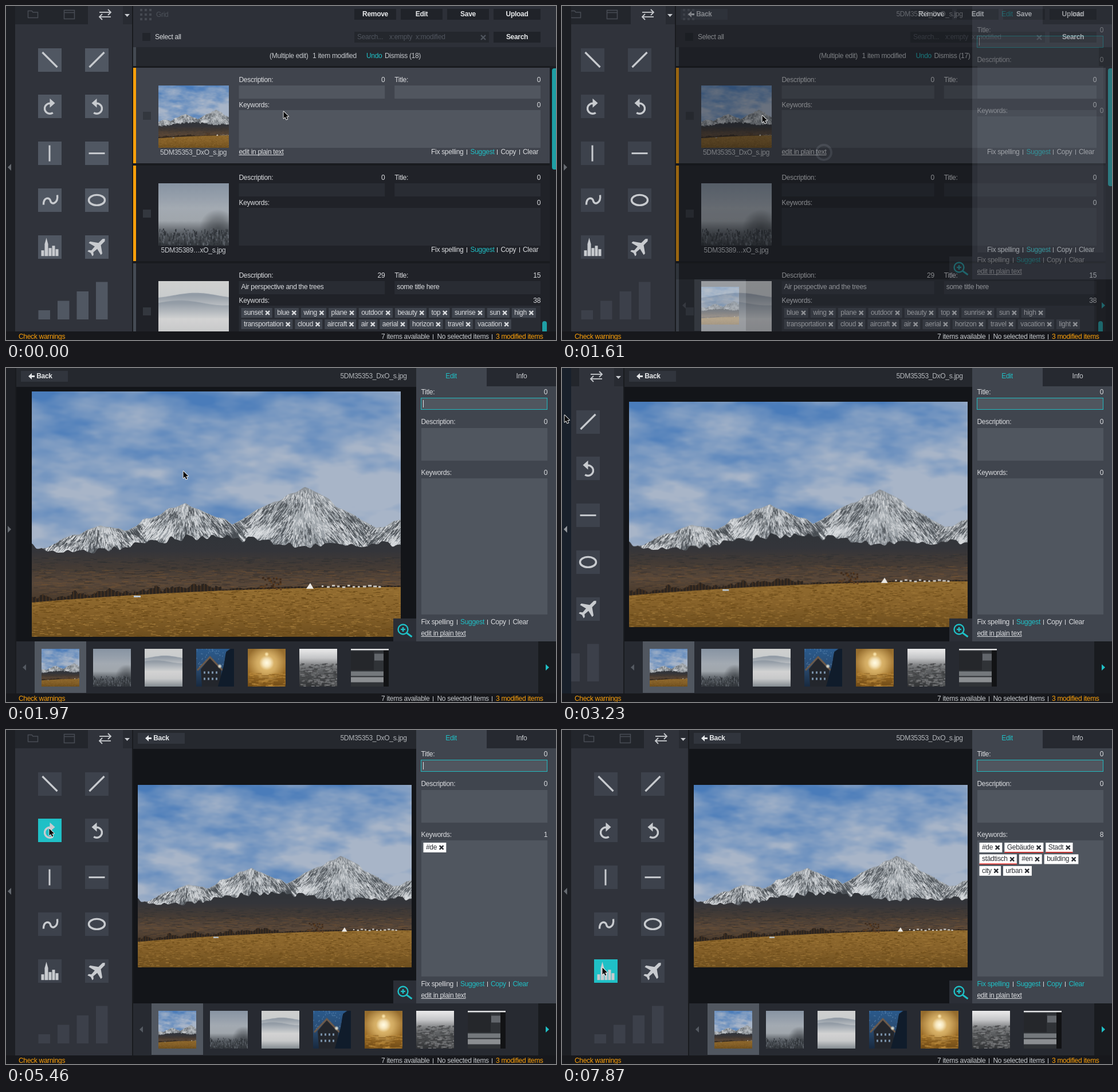
An HTML page with a canvas that plays this animation: 960x584 px, repeating every 7990 ms.

```html
<!DOCTYPE html>
<html lang="en">
<head>
<meta charset="utf-8">
<title>Keyword editor</title>
<style>
html, body { margin: 0; width: 100%; height: 100%; overflow: hidden; background: #17191d; }
canvas { display: block; width: 960px; height: 584px; }
</style>
</head>
<body>
<canvas id="stage" width="960" height="584"></canvas>
<script>
const LOOP = 7990, OPEN = 222, SHUT = 18;
const INK = '#dadcdf', SOFT = '#c6c9cd', TEAL = '#1fc0c6', ORANGE = '#fca00a', ICON = '#c8cbcf';
const FONT = '12px "Liberation Sans", Arial, sans-serif';
const screen = document.getElementById('stage').getContext('2d');
let g = screen;

let seed = 7;
const rnd = (a = 1, b = 0) => {
  seed = (seed * 16807) % 2147483647;
  return b + (a - b) * seed / 2147483647;
};
const clamp = v => Math.max(0, Math.min(1, v));
const mix = (a, b, p) => a + (b - a) * p;

/* value noise */
const hash = (x, y) => {
  const s = Math.sin(x * 127.1 + y * 311.7) * 43758.5453;
  return s - Math.floor(s);
};
function noise(x, y) {
  const i = Math.floor(x), j = Math.floor(y);
  const [u, v] = [x - i, y - j].map(f => f * f * (3 - 2 * f));
  return mix(mix(hash(i, j), hash(i + 1, j), u), mix(hash(i, j + 1), hash(i + 1, j + 1), u), v);
}
function fbm(x, y) {
  let sum = 0;
  for (let k = 0; k < 4; k++) sum += noise(x * 2 ** k, y * 2 ** k) / 2 ** (k + 1);
  return sum;
}

/* drawing helpers */
const box = (x, y, w, h, c) => { g.fillStyle = c; g.fillRect(x, y, w, h); };
function poly(pts, c) {
  g.fillStyle = c;
  g.beginPath();
  pts.forEach(p => g.lineTo(p[0], p[1]));
  g.closePath();
  g.fill();
}
function line(pts, c, w) {
  g.strokeStyle = c;
  g.lineWidth = w;
  g.beginPath();
  pts.forEach(p => g.lineTo(p[0], p[1]));
  g.stroke();
}
function ring(x, y, r, c, w) {
  g.strokeStyle = c;
  g.lineWidth = w;
  g.beginPath();
  g.arc(x, y, r, 0, 7);
  g.stroke();
}
function setFont(weight = '') {
  g.font = `${weight} ${FONT}`;
  g.letterSpacing = '-0.3px';
}
function put(s, x, y, c = INK, align = 'left', weight = '') {
  setFont(weight);
  g.textAlign = align;
  g.fillStyle = c;
  g.fillText(s, x, y + 4);
  return g.measureText(s).width;
}
const bold = (s, x, y) => put(s, x, y, '#e6e8ea', 'center', 'bold');
function link(s, x, y) {
  const w = put(s, x, y);
  box(x, y + 5, w, 1, INK);
}
function cross(x, y, r, c) {
  line([[x - r, y - r], [x + r, y + r]], c, 2.4);
  line([[x + r, y - r], [x - r, y + r]], c, 2.4);
}
function button(s, x, y, w, c) {
  box(x, y, w, 19, c);
  bold(s, x + w / 2, y + 9);
}
function fade(y0, y1, ...colors) {
  const f = g.createLinearGradient(0, y0, 0, y1);
  colors.forEach((c, i) => f.addColorStop(i / (colors.length - 1), c));
  return f;
}
function soft(x, y, r, rgb, a) {
  const f = g.createRadialGradient(x, y, 0, x, y, r);
  f.addColorStop(0, `rgba(${rgb},${a})`);
  f.addColorStop(0.5, `rgba(${rgb},${a * 0.65})`);
  f.addColorStop(1, `rgba(${rgb},0)`);
  box(x - r, y - r, 2 * r, 2 * r, f);
}
function specks(n, w, y0, y1, len, ...colors) {
  for (let i = 0; i < n; i++)
    box(rnd(w), rnd(y1, y0), rnd(len, len / 3), 1, colors[i % colors.length]);
}
function make(w, h, paint) {
  const c = document.createElement('canvas'), old = g;
  c.width = w;
  c.height = h;
  g = c.getContext('2d');
  paint(w, h);
  g = old;
  return c;
}

/* pictures */
// x, top, left slope, right slope
const peaks = [[120, 234, 0.4, 0.2], [268, 194, 0.45, 0.43], [477, 166, 0.5, 0.6], [690, 198, 0.48, 0]];
const ridge = x => Math.min(...peaks.map(([p, top, l, r]) => top + (x < p ? (p - x) * l : (x - p) * r)))
  + 7 * (noise(x / 14, 3) - 0.5);
const foot = x => 265 + 17 * (1 - x / 800) * Math.cos((x - 90) / 72) + 12 * (noise(x / 9, 8) - 0.5);
const field = x => 369 - 27 * (1 - (1 - x / 644) ** 2);
function under(f, w, h, c) {
  const pts = [[0, h]];
  for (let x = 0; x <= w; x += 2) pts.push([x, f(x)]);
  poly([...pts, [w, h]], c);
}
function sky(w, h) {
  const img = g.createImageData(w, h), blue = [74, 124, 186], cloud = [168, 181, 200];
  for (let y = 0; y < h; y++) for (let x = 0; x < w; x++) {
    const gap = Math.exp(-(((x - 250) / 190) ** 2) - ((y - 85) / 70) ** 2);
    const p = clamp((fbm((x + y) / 120, (y - x * 0.2) / 50) - 0.5) * 2.2 + 0.72 - 0.62 * gap + y / h * 0.2);
    blue.forEach((b, k) => { img.data[(y * w + x) * 4 + k] = mix(b, cloud[k], p); });
    img.data[(y * w + x) * 4 + 3] = 255;
  }
  g.putImageData(img, 0, 0);
}
function mountains(w, h) {
  sky(w, 300);
  under(ridge, w, h, fade(165, 285, '#8b9197', '#a5abb0', '#8d9399'));
  for (let i = 0; i < 5200; i++) {
    const x = rnd(w), top = ridge(x), d = rnd(), len = rnd(9, 3);
    const y = top + (foot(x) - top) * d;
    const p = peaks.map(k => k[0]).reduce((a, b) => Math.abs(b - x) < Math.abs(a - x) ? b : a);
    const rock = fbm(x / 22, y / 22) + (x > p ? 0.04 : -0.04) + rnd(0.22, -0.22) > 0.47;
    const lean = Math.max(-1, Math.min(1, (x - p) / 40)) * len * 0.8;
    g.globalAlpha = 0.75;
    line([[x, y], [x + lean, y + len]], rock ? '#484d53' : '#dcdfe2', rnd(1.7, 0.6));
  }
  g.globalAlpha = 1;
  under(foot, w, h, fade(250, 365, '#303439', '#34353a', '#443b35', '#584739', '#493a2c'));
  g.globalAlpha = 0.55;
  specks(500, w, 290, 316, 16, '#2d2e31', '#4c4138');
  specks(1100, w, 312, 356, 18, '#2f2b29', '#6a5038', '#4a3d33', '#745334');
  g.globalAlpha = 1;
  for (let x = 0; x < w; x += 2) {
    const k = (x < 330 ? 20 : 5) * fbm(x / 9, 5);
    box(x, field(x) - k, 3, k + 1, x % 6 ? '#2b241f' : '#43301f');
  }
  under(field, w, h, fade(342, h, '#936d30', '#87622a', '#6d4e1e'));
  g.save();
  under(field, w, h, 'rgba(0,0,0,0)');
  g.clip();
  specks(2400, w, 343, h, 9, '#a07838', '#684817', '#7c5822');
  g.restore();
  for (let i = 0; i < 40; i++) box(rnd(434, 398), rnd(345, 324), 3, 3, i % 2 ? '#3f2b1c' : '#5f4023');
  poly([[479, 345], [486, 335], [492, 345]], '#eceae6');
  for (let x = 506; x < 606; x += 9) box(x, rnd(341, 338), rnd(7, 3), 3, '#c9c5bf');
  box(178, 357, 12, 3, '#b9c4cf');
}
function fog(w, h) {
  box(0, 0, w, h, fade(0, h, '#8793a2', '#949eaa', '#a3aab2', '#a0a6ac', '#565b61', '#34383d'));
  soft(w * 0.85, h * 0.72, h * 0.3, '48,52,57', 0.6);
  for (let i = 0; i < 300; i++)
    box(rnd(w), rnd(h, h * 0.72), 1.2, rnd(7, 2), i % 3 ? '#2b2f34' : '#686e76');
}
function haze(w, h) {
  box(0, 0, w, h, fade(0, h, '#cfd0cf', '#c9cccd', '#d2d3d3', '#c9cacb', '#a3a8ac'));
  [0.23, 0.35].forEach(y => under(
    x => h * (y + 0.04 * Math.sin(x / w * 5 + y * 9)), w, h,
    fade(h * y, h * (y + 0.26), '#939ca6', '#d2d3d3')));
  box(0, h * 0.6, w, h * 0.4, fade(h * 0.6, h, '#d3d3d3', '#c8c9ca', '#868d92'));
}
function house(w, h) {
  box(0, 0, w, h, fade(0, h, '#2a5a8c', '#2a4b70', '#182a40'));
  specks(70, w, 0, 34, 2, '#6d95bd');
  poly([[8, 36], [24, 16], [44, 36], [42, 66], [10, 66]], '#23262c');
  line([[2, 38], [24, 15], [46, 38]], '#6d5a4a', 3);
  for (let i = 0; i < 8; i++) box(13 + i % 4 * 7, 40 + (i >> 2) * 11, 3, 4, '#7890a8');
  poly([[38, 66], [48, 30], [52, 6], [60, 0], [66, 0], [66, 66]], '#101c2b');
  soft(41, 31, 4, '240,240,225', 1);
}
function sun(w, h) {
  box(0, 0, w, h, fade(0, h, '#926a2c', '#a37734', '#9a6c26', '#6f4a16'));
  soft(33, 26, 34, '240,204,128', 0.95);
  soft(33, 25, 13, '255,250,226', 1);
  soft(33, 10, 4, '255,236,180', 1);
  specks(120, w, 42, 66, 12, '#845a1c', '#b9883a');
}
function sea(w, h) {
  box(0, 0, w, h, fade(0, h, '#ececec', '#c4c5c7', '#6c6e70', '#4c4e50', '#303234'));
  specks(240, w, 26, 66, 9, '#3c3d3f', '#858688');
}
function panels(w, h) {
  box(0, 0, w, h, '#303337');
  box(0, 0, w, 3, '#e2e3e4');
  box(0, 5, 40, 33, '#25272b');
  box(41, 9, 16, 12, '#62666b');
  box(0, 40, 57, 8, '#74787c');
  box(0, 50, 57, 9, '#8b8e91');
  box(57, 3, 9, 63, '#121315');
}
const photo = make(644, 429, mountains);
const fogPic = make(122, 109, fog), hazePic = make(122, 109, haze);
const strip = [photo, fogPic, hazePic, ...[house, sun, sea, panels].map(f => make(66, 66, f))];
// centre crop to fill the box
function cover(pic, x, y, w, h) {
  const k = Math.max(w / pic.width, h / pic.height), sw = w / k, sh = h / k;
  g.imageSmoothingQuality = 'high';
  g.drawImage(pic, (pic.width - sw) / 2, (pic.height - sh) / 2, sw, sh, x, y, w, h);
}

/* icons, drawn around 0,0 */
const stroke = (c, path) => {
  g.strokeStyle = c;
  g.lineWidth = 3.4;
  g.beginPath();
  path();
  g.stroke();
};
function turn(c) {
  stroke(c, () => g.arc(0, 3.5, 9, Math.PI * 0.3, Math.PI * 1.52));
  poly([[0, -14], [9, -6], [0, 2]], c);
}
const icons = [
  c => line([[-13, -13], [13, 13]], c, 3.2),
  c => line([[-13, 13], [13, -13]], c, 3.2),
  turn,
  c => { g.scale(-1, 1); turn(c); },
  c => line([[-0.5, -14], [-0.5, 14]], c, 3),
  c => line([[-14, 0], [14, 0]], c, 3),
  c => stroke(c, () => {
    g.moveTo(-11, 8);
    g.bezierCurveTo(-11, -6, 0, -5, 1, 1);
    g.bezierCurveTo(3, 10, 15, 5, 13, -9);
  }),
  c => stroke(c, () => g.ellipse(0, 0, 14, 9, 0, 0, 7)),
  c => {
    poly([[-9, 16], [-9, -5], [-6, -16], [-3, -5], [-3, 16]], c);
    [6, 2, -2, 4].forEach((y, i) => box(i * 6 - (i ? 8 : 15), y, 5, 16 - y, c));
  },
  c => {
    const half = [[0, -20], [2.8, -17], [3, -7], [15, 1.5], [15, 5], [3, 2], [2.3, 11], [6, 14], [6, 17]];
    g.rotate(Math.PI / 4);
    poly([...half, [0, 15], ...half.slice(1).reverse().map(([x, y]) => [-x, y])], c);
  }
];

/* timing */
const edgeKeys = [[0, OPEN], [1610, 199], [1760, SHUT], [3110, 44], [3230, 109], [3380, OPEN]];
// from, until, where the pointer ends up
const moves = [[360, 740, 349, 191], [1760, 1970, 309, 180], [2090, 2750, 4, 82],
  [3710, 4380, 40, 104], [4470, 4930, 75, 172], [6580, 7250, 70, 415]];
const words = ['#de', 'Gebäude', 'Stadt', 'städtisch', '#en', 'building', 'city', 'urban'];
const wordKeys = [[0, []], [5340, ['#de']], [5940, ['#de', '#en']], [7610, words]];
const at = (list, t) => list.filter(k => k[0] <= t).pop()[1];
const caretOn = t => Math.floor((t - 1610) / 481) % 2 === 0;
function pointer(t) {
  let x = 484, y = 184;
  for (const [from, until, tx, ty] of moves) {
    if (t < from) break;
    const steps = Math.floor((t - from) / 110) * 110;
    const p = t >= until ? 1 : 1 - (1 - steps / (until - from)) ** 3;
    x = mix(x, tx, p);
    y = mix(y, ty, p);
  }
  return [Math.round(x), Math.round(y)];
}

/* parts */
function tags(list, x0, y, right, ground, ink) {
  let x = x0;
  for (const s of list) {
    setFont();
    const tw = g.measureText(s).width, w = tw + 20.7;
    if (x + w > right) { x = x0; y += 20.4; }
    box(x, y - 8, w, 17, ground);
    put(s, x + 4.5, y, ink);
    cross(x + tw + 12.5, y + 0.5, 3.4, ink);
    if (ground === '#ffffff' && /^[GSs]/.test(s)) box(x, y + 8, w, 1.6, '#e0302c');
    x += w + 4;
  }
}
function actions(x, y, lit) {
  [['Fix spelling', 0], ['Suggest', 68.5], ['Copy', 121.5], ['Clear', 160]].forEach(([s, dx], i) => {
    put(s, x + dx, y, lit[i] ? TEAL : INK);
    if (i) box(Math.round(x + dx - 6.5), y - 4, 1, 9, INK);
  });
}

function sidebar(L, t, cx, cy) {
  const d = L - OPEN, bright = t < 1610, dim = '#484c54';
  g.save();
  g.beginPath();
  g.rect(16, 0, Math.max(0, L - 16), 569);
  g.clip();
  g.translate(d, 0);
  box(16, 0, 204, 569, '#30333b');
  box(16, 0, 127, 32, '#23262c');
  box(204, 0, 16, 32, '#282b32');
  box(220, 0, 2, 569, '#191b1f');
  line([[38.5, 20.5], [38.5, 8.5], [45, 8.5], [47, 11], [55.5, 11], [55.5, 20.5], [38, 20.5]], dim, 1.5);
  g.strokeRect(101.5, 7.5, 18, 15);
  line([[101, 11.5], [120, 11.5]], dim, 1.5);
  [1, -1].forEach(k => {
    const y = 15 - 4 * k, tip = 173 + 10 * k;
    line([[173 - 10 * k, y], [tip, y]], ICON, 1.8);
    line([[tip - 5 * k, y - 5], [tip, y], [tip - 5 * k, y + 5]], ICON, 1.8);
  });
  poly([[207, 14], [216, 14], [211.5, 19]], ICON);
  const cell = bright ? '#505762' : '#3d424c';
  icons.forEach((draw, i) => {
    const x = 56 + i % 2 * 82, y = 73.5 + (i >> 1) * 81.8;
    const over = cx - d >= x && cx - d < x + 41 && cy >= y && cy < y + 41;
    box(x, Math.round(y), 41, 41, over ? TEAL : cell);
    g.save();
    g.translate(x + 20.5, y + 20.5);
    draw(ICON);
    g.restore();
  });
  for (let i = 0; i < 4; i++)
    box(56.5 + i * 33.5, 532 - i * 16.5, 20.5, 16 + i * 16.5, bright ? '#505762' : '#3c404a');
  g.restore();
}

const rows = [
  { pic: photo, name: '5DM35353_DxO_s.jpg', counts: [0, 0, 0], bg: '#40444d', field: '#51565f' },
  { pic: fogPic, name: '5DM35389…xO_s.jpg', counts: [0, 0, 0], bg: '#202228', field: '#292c33' },
  { pic: hazePic, name: '', counts: [29, 15, 38], bg: '#202228', field: '#292c33' }
];
const rowWords = ('sunset blue wing plane outdoor beauty top sunrise sun high transportation cloud ' +
  'aircraft air aerial horizon travel vacation light').split(' ');

function gridView(L, t) {
  const shifted = L < OPEN, nx = (L - OPEN) / 2;
  box(L, 0, 960 - L, 569, '#191b1f');
  box(L, 0, 960 - L, 72, '#2d3038');
  for (let i = 0; i < 9; i++) box(L + 12 + i % 3 * 8, 5 + Math.floor(i / 3) * 8, 4, 4, '#454951');
  put('Grid', L + 40, 15, '#4d525a');
  ['Remove', 'Edit', 'Save', 'Upload'].forEach((s, i) => button(s, 608 + i * 81, 5, i < 3 ? 73 : 82, '#202329'));
  box(L + 16, 47, 14, 14, '#22252b');
  put('Select all', L + 38, 54);
  box(608, 45, 235, 19, '#24272d');
  put('Search...', 613, 54, '#4f545d');
  put('x:empty  x:modified', 669, 54, '#4f545d');
  cross(833, 55, 4, '#4f545d');
  button('Search', 851, 45, 82, '#202329');

  box(L, 72, 738, 33, '#25282e');
  box(L, 72, 5, 33, '#444a52');
  put('(Multiple edit)', 460 + nx, 87, SOFT);
  put('1 item modified', 535 + nx, 87, SOFT);
  put('Undo', 629 + nx, 87, TEAL);
  put(`Dismiss (${t < 650 ? 18 : 17})`, 661 + nx, 87, SOFT);

  const fx = L + 184.5, fw = (933 - fx - 17) / 2, tx = fx + fw + 17;
  rows.forEach(({ pic, name, counts, bg, field: ground }, i) => {
    const y = 108 + 171 * i;
    box(L + 5, y, 944 - L, 167, bg);
    box(L, y, 5, 167, i < 2 ? ORANGE : '#454b54');
    box(L + 17, y + 77, 14, 14, '#33373e');
    cover(pic, L + 44, y + 31, 122.5, 109);
    put(name, L + 105, y + 148, '#c9ccd0', 'center');
    put('Description:', fx, y + 21);
    put('Title:', tx, y + 21);
    put('Keywords:', fx, y + 65);
    put(counts[0], fx + fw, y + 21, INK, 'right');
    put(counts[1], 933, y + 21, INK, 'right');
    put(counts[2], 933, y + 65, INK, 'right');
    box(fx, y + 31, fw, 23, ground);
    box(tx, y + 31, fw, 23, ground);
    box(fx, y + 74, 933 - fx, 66, ground);
    if (i < 2) actions(742, y + 147, [0, 1, 0, 0]);
  });
  link('edit in plain text', fx, 255);
  put('Air perspective and the trees', fx + 4, 491);
  put('some title here', tx + 4, 491);
  tags(rowWords.slice(shifted ? 1 : 0, 10), fx + 4, 536, 960, '#40454e', INK);
  tags(rowWords.slice(10, shifted ? 19 : 18), fx + 4, 556, 960, '#40454e', INK);
  box(949, 105, 11, 464, '#1c1e23');
  g.fillStyle = '#1f9fa5';
  g.beginPath();
  g.roundRect(953, 109, 10, shifted ? 206 : 177, 4);
  g.roundRect(936, 551, 8, 30, 4);
  g.fill();
}

function viewer(L, t) {
  box(L, 0, 716 - L, 33, '#25282e');
  box(L, 33, 716 - L, 445, '#131519');
  button('Back', L + 9, 5, 82, '#31353d');
  poly([[L + 22, 14.5], [L + 28, 9], [L + 28, 20]], '#e6e8ea');
  box(L + 27, 13, 6, 3, '#e6e8ea');
  put('5DM35353_DxO_s.jpg', 699.5, 14, '#b3b6ba', 'right');

  if (t < 1760) ring((L + 716) / 2, 256, 13, '#3c4047', 4);
  else {
    const w = Math.min(644, 699 - L), h = Math.round(w / 1.5);
    g.globalAlpha = t < 1970 ? 0.6 : 1;
    cover(photo, Math.round((L + 716 - w) / 2), Math.round(255.7 - h / 2), w, h);
    g.globalAlpha = 1;
  }
  box(676, 438, 40, 40, '#2b2e36');
  ring(693, 457, 8.5, TEAL, 2.4);
  line([[699, 463], [708.5, 470]], TEAL, 3);
  line([[689, 457], [697, 457]], TEAL, 2.4);
  line([[693, 453], [693, 461]], TEAL, 2.4);

  box(L, 478, 960 - L, 91, '#272a31');
  box(L + 33, 478, 90, 90, '#515760');
  strip.forEach((p, i) => {
    if (!i || t >= 1970) cover(p, L + 45 + i * 90, 490.5, 66, 66);
  });
  poly([[L + 12, 523.5], [L + 18, 518], [L + 18, 529]], '#555a62');
  box(929, 478, 31, 91, '#191b1f');
  poly([[942, 518], [948, 523.5], [942, 529]], TEAL);
}

function panel(t) {
  const list = at(wordKeys, t), any = list.length;
  box(716, 0, 244, 478, '#40454e');
  box(839, 0, 121, 32, '#262930');
  put('Edit', 777, 14, TEAL, 'center');
  put('Info', 900, 14, SOFT, 'center');
  [['Title:', 42, 0], ['Description:', 94, 0], ['Keywords:', 183, any]].forEach(([s, y, n]) => {
    put(s, 724.5, y);
    put(n, 945, y, INK, 'right');
  });
  box(724, 52, 221, 21, '#22b9bf');
  box(725, 53, 219, 19, '#50565f');
  if (caretOn(t)) box(728, 56, 1, 13, '#e0e2e4');
  box(725, 105, 220, 57, '#50565f');
  box(725, 193, 220, 238, '#50565f');
  tags(list, 728.5, 205, 942, '#ffffff', '#2b2e34');
  actions(724.5, 444, [any > 2, 1, any, any]);
  link('edit in plain text', 724.5, 464);
}

function frame(t, cx) {
  const hover = cx < 16, s = t >= 1610 && t < 3110 ? 3 : -3;
  box(0, 0, 16, 569, hover ? '#18202b' : '#1d1f24');
  poly([[6 - s, 276], [6 + s, 282], [6 - s, 288]], hover ? '#92969b' : '#666a70');
  box(0, 569, 960, 15, '#17181c');
  put('Check warnings', 22, 578, ORANGE);
  put('7 items available', 655, 578, SOFT);
  put('No selected items', 752.5, 578, SOFT);
  put('3 modified items', 855, 578, ORANGE);
  box(745, 574, 1, 9, SOFT);
  box(848, 574, 1, 9, SOFT);
}

function arrow(x, y) {
  const pts = [[0, 0], [0, 12], [2.7, 9.5], [4.8, 14], [6.8, 13.1], [4.8, 8.8], [8.6, 8.6]];
  g.save();
  g.translate(x + 0.5, y + 0.5);
  g.lineJoin = 'round';
  line([...pts, pts[0], pts[1]], '#f2f2f2', 1.8);
  poly(pts, '#0b0b0c');
  g.restore();
}

const layer = make(960, 584, () => {});
function draw(now) {
  const t = now % LOOP, L = at(edgeKeys, t), [cx, cy] = pointer(t);
  box(0, 0, 960, 584, '#17191d');
  if (t < 1760) gridView(L, t);
  if (t >= 1610) {
    g = layer.getContext('2d');
    g.clearRect(0, 0, 960, 584);
    viewer(L - 1, t);
    panel(t);
    g = screen;
    g.globalAlpha = t < 1760 ? 0.42 : 1;
    g.drawImage(layer, 0, 0);
    g.globalAlpha = 1;
  }
  sidebar(L, t, cx, cy);
  frame(t, cx);
  arrow(cx, cy);
}

const start = performance.now();
function tick() {
  draw(performance.now() - start);
  requestAnimationFrame(tick);
}
tick();
</script>
</body>
</html>
```
